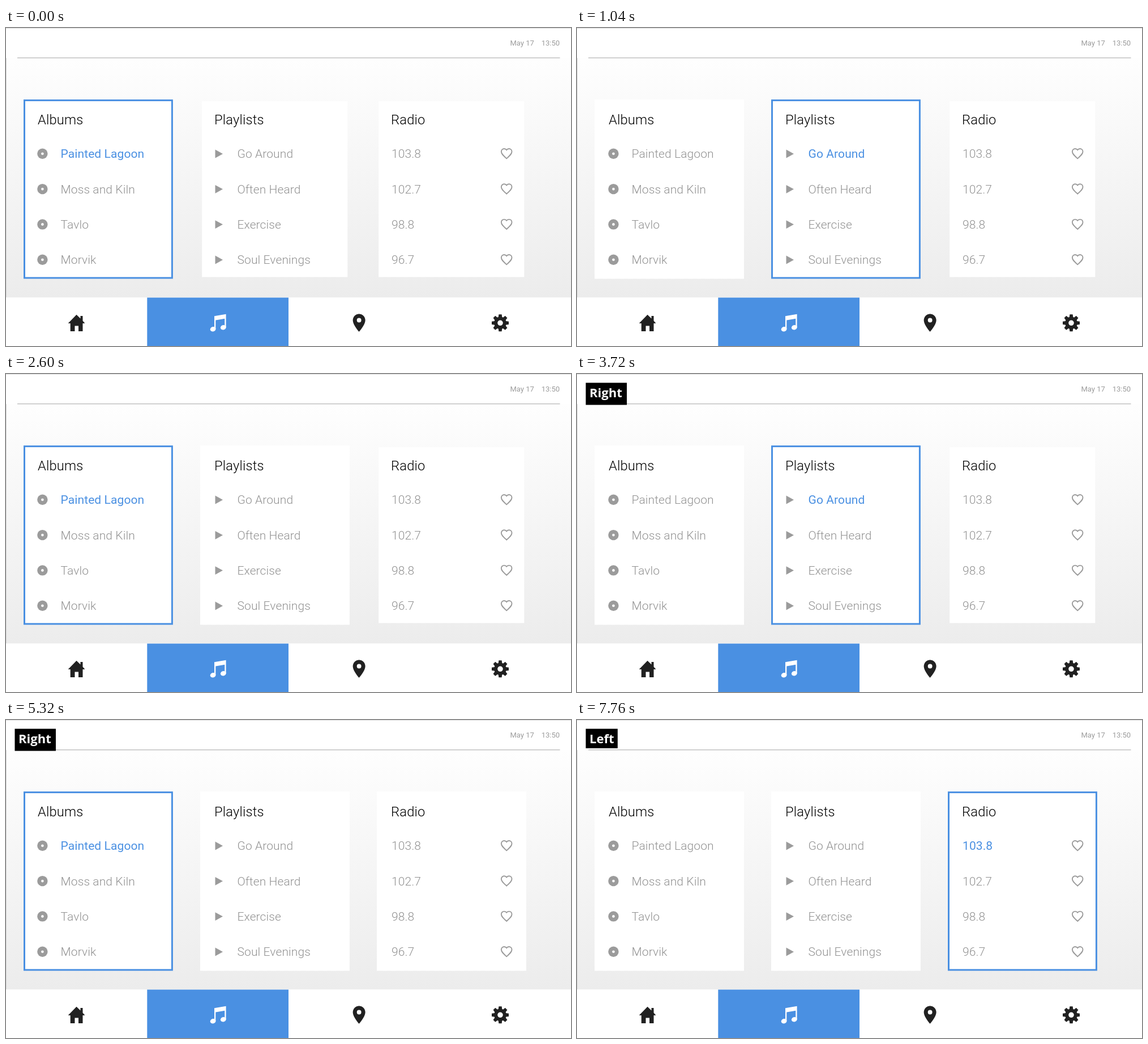
An HTML page that plays this animation: 998x561 px, repeating every 8 s.

```html
<!DOCTYPE html>
<html lang="en">
<head>
<meta charset="utf-8">
<title>Music screen</title>
<style>
  html, body { margin: 0; width: 100%; height: 100%; overflow: hidden; background: #fff; }
  svg { display: block; width: 100%; height: 100%; font-family: Roboto, "Open Sans", sans-serif; }
  .clock { font-size: 13px; fill: #9b9b9b; }
  .title { font-size: 23.7px; font-weight: 300; fill: #000; letter-spacing: .2px; }
  .item { font-size: 21px; font-weight: 300; fill: #929292; letter-spacing: .1px; }
  .item.on { font-weight: 400; fill: #4a90e2; }
  .key { font: 700 22px "Open Sans", "Noto Sans", sans-serif; fill: #fff; }
  .gray { fill: #9b9b9b; }
  .heart { fill: none; stroke: #9b9b9b; stroke-width: 1.9; }
  .dark { fill: #212121; }
</style>
</head>
<body>
<svg id="stage" viewBox="0 0 998 561" preserveAspectRatio="none">
  <defs>
    <linearGradient id="shade" x1="0" y1="0" x2="0" y2="1">
      <stop offset="0" stop-color="#fefefe"/>
      <stop offset="1" stop-color="#ececec"/>
    </linearGradient>
  </defs>
  <rect width="998" height="561" fill="#fff"/>
  <rect y="53" width="998" height="423" fill="url(#shade)"/>
  <rect width="998" height="1" fill="#dedede"/>
  <rect y="53" width="1" height="422" fill="#d8d8d8"/>
  <rect x="20" y="52" width="958.5" height="1.3" fill="#b9b9b9"/>
  <text class="clock" x="890.5" y="30.5">May 17</text>
  <text class="clock" x="978" y="30.5" text-anchor="end">13:50</text>

  <g id="cards"></g>

  <rect y="475.3" width="998" height="86" fill="#fff"/>
  <rect x="249.3" y="475.6" width="249.7" height="86" fill="#4a90e2"/>
  <path class="dark" d="M124.5 505.8L131.5 512.6V508H135.5V516.6L139.4 521H135.5V535H128V525.5H121.5V535H113.7V521H109.7Z"/>
  <g fill="#fff">
    <path d="M368 508.2L388.6 504.8V528H386.3V512.8L370.3 515.4V531H368Z"/>
    <ellipse cx="365.6" cy="531.3" rx="5" ry="4.1" transform="rotate(-15 365.6 531.3)"/>
    <ellipse cx="383.8" cy="528.3" rx="5" ry="4.1" transform="rotate(-15 383.8 528.3)"/>
  </g>
  <path class="dark" fill-rule="evenodd" transform="translate(604.8 501.4) scale(1.57)"
    d="M12 2C8.13 2 5 5.13 5 9c0 5.25 7 13 7 13s7-7.75 7-13c0-3.87-3.13-7-7-7zm0 9.5a2.5 2.5 0 0 1 0-5 2.5 2.5 0 0 1 0 5z"/>
  <g id="gear" transform="translate(873 520.3)">
    <circle r="7.8" fill="none" stroke="#212121" stroke-width="6"/>
  </g>

  <g id="key">
    <rect fill="#000"/>
    <text class="key" x="22" y="40.8"></text>
  </g>
</svg>
<script>
const $ = id => document.getElementById(id);
const LOOP = 8000;
const ROWS = [222, 284.3, 346.6, 409];
const KEYS = { Right: [72.5, 39], Left: [56.3, 34.3] };

// start time, key label, focused card
const STEPS = [
  [0, "", 0], [120, "Right", 0], [200, "Right", 1], [1040, "", 1],
  [1640, "Left", 0], [2600, "", 0], [3720, "Right", 1], [4520, "Right", 2],
  [5320, "Right", 0], [6240, "", 0], [7760, "Left", 2]
];

const CARDS = [
  { x: 31, title: "Albums", icon: "disc", items: ["Painted Lagoon", "Moss and Kiln", "Tavlo", "Morvik"] },
  { x: 343, title: "Playlists", icon: "play", items: ["Go Around", "Often Heard", "Exercise", "Soul Evenings"] },
  { x: 655, title: "Radio", icon: "heart", items: ["103.8", "102.7", "98.8", "96.7"] }
];

const HEART = "M0 9L-1.3 7.8C-6.2 3.4-9.3.6-9.3-3.2-9.3-6.2-7-8.3-4.2-8.3-2.5-8.3-.9-7.5 0-6.2" +
  ".9-7.5 2.5-8.3 4.2-8.3 7-8.3 9.3-6.2 9.3-3.2 9.3.6 6.2 3.4 1.3 7.8Z";

function add(parent, tag, attrs, text = "") {
  const node = document.createElementNS("http://www.w3.org/2000/svg", tag);
  for (const name in attrs) node.setAttribute(name, attrs[name]);
  node.textContent = text;
  return parent.appendChild(node);
}

const ICONS = {
  disc(g, x, y) {
    add(g, "circle", { class: "gray", cx: x + 33.4, cy: y - .2, r: 9.2 });
    add(g, "circle", { fill: "#fff", cx: x + 33.4, cy: y - .2, r: 2.3 });
  },
  play(g, x, y) {
    add(g, "path", { class: "gray", d: `M${x + 26.5} ${y - 7.4}l13.5 7.4l-13.5 7.4z` });
  },
  heart(g, x, y) {
    add(g, "path", { class: "heart", d: HEART, transform: `translate(${x + 229.2} ${y - .7})` });
  }
};

for (const card of CARDS) {
  const g = add($("cards"), "g", {});
  card.box = add(g, "rect", { fill: "#fff", "stroke-width": 3 });
  add(g, "text", { class: "title", x: card.x + 25, y: 170 }, card.title);
  const indent = card.icon === "heart" ? 26 : 65.5;
  card.texts = card.items.map((item, i) => {
    ICONS[card.icon](g, card.x, ROWS[i]);
    return add(g, "text", { class: "item", x: card.x + indent, y: ROWS[i] + 7.4 }, item);
  });
}

for (let a = 0; a < 360; a += 45)
  add($("gear"), "path", { class: "dark", d: "M-3.4-9.5L-2.6-15H2.6L3.4-9.5Z", transform: `rotate(${a})` });

function place(rect, x, y, width, height) {
  Object.entries({ x, y, width, height }).forEach(([name, value]) => rect.setAttribute(name, value));
}

function show(index) {
  const [, key, focus] = STEPS[index];
  const visited = STEPS.slice(0, index + 1).map(step => step[2]);
  CARDS.forEach((card, i) => {
    const on = i === focus;
    // a card keeps its larger size once it has been focused
    if (visited.includes(i)) place(card.box, card.x + 1.5, 127.6, 260.9, 313.3);
    else place(card.box, card.x + 4.7, 130.7, 254.1, 307.1);
    card.box.setAttribute("stroke", on ? "#4a90e2" : "#fff");
    card.texts[0].classList.toggle("on", on);
  });
  $("key").style.display = key ? "" : "none";
  if (key) {
    const [rect, text] = $("key").children;
    place(rect, 15.5, 15.5, ...KEYS[key]);
    text.textContent = key;
  }
}

const start = performance.now();
let current = -1;
function tick() {
  const t = (performance.now() - start) % LOOP;
  const index = STEPS.findLastIndex(step => step[0] <= t);
  if (index !== current) show(current = index);
  requestAnimationFrame(tick);
}
tick();
</script>
</body>
</html>
```
